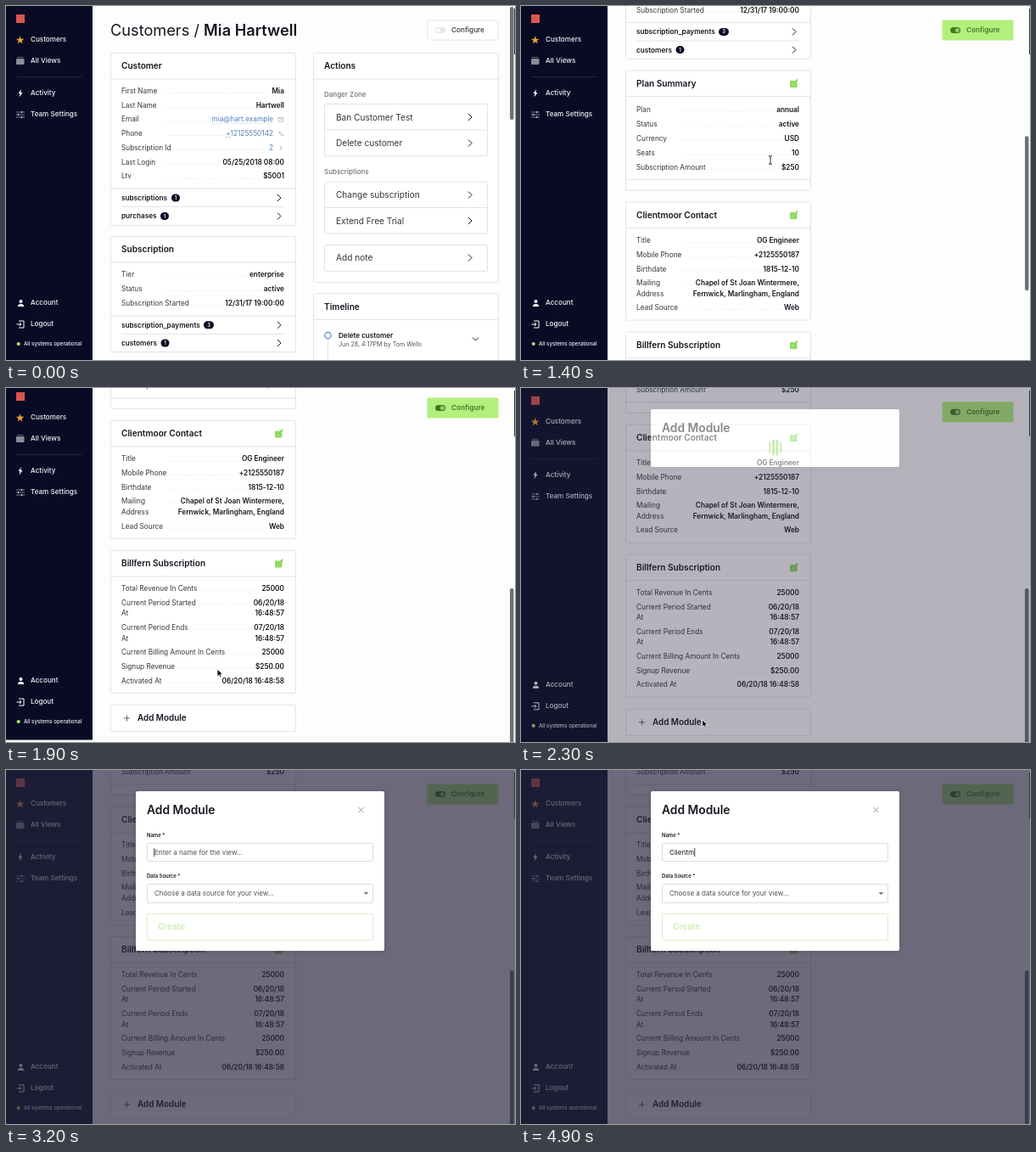
An HTML page for the animation above (5 s loop, 600 by 417 pixels).

```html
<!DOCTYPE html>
<html lang="en">
<head>
<meta charset="utf-8">
<title>Customer view</title>
<style>
html, body { margin: 0; width: 100%; height: 100%; overflow: hidden; background: #fdfdfe; }
svg { display: block; width: 600px; height: 417px; }
text { font-family: Inter, Roboto, sans-serif; white-space: pre; }
.mask text { paint-order: stroke; stroke: #fff; stroke-width: 5px; stroke-linejoin: round; }
</style>
</head>
<body>
<svg id="stage" viewBox="0 0 600 417"></svg>
<script>
const INK = '#15161f', BODY = '#34353f', EDGE = '#e3e3ea', GREEN = '#8edb57';
const SCROLL = 533, LOOP = 5000, TYPED = 'Clientm';

// y is the middle of the capitals
const text = (x, y, s, size = 8.25, weight = 400, fill = BODY, anchor = 'start', extra = '') =>
  `<text x="${x}" y="${y + size * .36}" font-size="${size}" font-weight="${weight}" fill="${fill}" text-anchor="${anchor}" ${extra}>${s}</text>`;
const rect = (x, y, w, h, fill, extra = '') =>
  `<rect x="${x}" y="${y}" width="${w}" height="${h}" fill="${fill}" ${extra}/>`;
const box = (x1, y1, x2, y2, edge = EDGE, fill = '#fff') =>
  rect(x1 + .5, y1 + .5, x2 - x1 - 1, y2 - y1 - 1, fill, `rx="1.5" stroke="${edge}"`);
const line = (d, color = INK, w = 1, extra = '') =>
  `<path d="${d}" fill="none" stroke="${color}" stroke-width="${w}" ${extra}/>`;
const shape = (d, fill) => `<path d="${d}" fill="${fill}"/>`;
const group = (name, s) => `<g class="${name}">${s}</g>`;
const rule = (y, x1 = 124, x2 = 341) => line(`M${x1} ${y}H${x2}`, EDGE);
const chevron = (x, y) => line(`M${x - 2} ${y - 4}l4 4l-4 4`);
const plus = (x, y) => line(`M${x - 3.5} ${y}h7M${x} ${y - 3.5}v7`, '#55565f', .9);
const pencil = (x, y) => group('edit',
  rect(x - 4.5, y - 3.5, 8.5, 8, GREEN, 'rx="1"') +
  line(`M${x - 1.5} ${y + 1.5}l6 -6.5`, '#d5f5bb', 2.2) + line(`M${x - 1} ${y + 1}l5.5 -6`, '#6cc23a', 1.2));

function row(y, label, value, link) {
  const right = link ? 315 : 328;
  const lines = (x, s, weight, fill, anchor, extra) => s.split('|')
    .map((part, i) => text(x, y + i * 12.6, part, 8.25, weight, fill, anchor, extra)).join('');
  return line(`M190 ${y + 2.5}H${right}`, '#e9e9ef', .8, 'stroke-dasharray="1 1"') +
    lines(136, label, 400, BODY, 'start', '') +
    lines(right, value, link ? 400 : 600, link ? '#5480bd' : INK, 'end', link ? 'text-decoration="underline"' : '');
}
const linkRow = (y, label, x, n) =>
  text(136, y, label, 8.2, 600, INK) +
  rect(x - (n > 1 ? 6 : 5), y - 4.5, n > 1 ? 12 : 10, 9, '#0b0d22', 'rx="4.5"') +
  text(x, y, n, 5.8, 600, '#fff', 'middle') + chevron(322, y);
const card = (top, bottom, title, body) =>
  box(123, top, 342, bottom) + rule(top + 31) +
  text(136, top + 15.8, title, 10.1, 600, INK) + pencil(321.5, top + 16) + group('mask', body);

function action(y, label) {
  return text(389, y, label, 10.1, 400, BODY) + group('plain', chevron(547, y)) + pencil(547, y);
}
const pair = (y, title, a, b) =>
  text(375, y, title, 8, 500, '#6d6e78') + box(375, y + 11, 568, y + 73) +
  rule(y + 42, 376, 567) + action(y + 27, a) + action(y + 57.5, b);

const page =
  text(123, 28.5, 'Customers / <tspan font-weight="600">Mia Hartwell</tspan>', 18.2, 400, INK) +
  card(55, 259, 'Customer',
    row(100, 'First Name', 'Mia') + row(117, 'Last Name', 'Hartwell') +
    row(133.5, 'Email', 'mia@hart.example', 1) + row(150, 'Phone', '+12125550142', 1) +
    row(167, 'Subscription Id', '2', 1) + row(184, 'Last Login', '05/25/2018 08:00') +
    row(200.5, 'Ltv', '$5001')) +
  line('M321 131.5h6v4.5h-6zl3 2.5l3 -2.5', '#a9a9b4', .7) +
  line('M322 148q0 4 4.5 5l.5 -1.5l-1.5 -1l-1 .7l-1.5 -2l.5 -1z', '#a9a9b4', .7) +
  line('M323 165l2 2.3l-2 2.3', '#8d8d99', .8) +
  rule(215) + linkRow(226, 'subscriptions', 200, 1) + rule(236.5, 136, 328) + linkRow(247.5, 'purchases', 187, 1) +
  card(271, 408, 'Subscription',
    row(316.5, 'Tier', 'enterprise') + row(333.3, 'Status', 'active') +
    row(350, 'Subscription Started', '12/31/17 19:00:00')) +
  rule(365) + linkRow(375.8, 'subscription_payments', 239, 3) + rule(386.5, 136, 328) + linkRow(397, 'customers', 187.5, 1) +
  card(421, 563, 'Plan Summary',
    row(467, 'Plan', 'annual') + row(484, 'Status', 'active') + row(501, 'Currency', 'USD') +
    row(518, 'Seats', '10') + row(535, 'Subscription Amount', '$250')) + rule(550) +
  card(576, 716, 'Clientmoor Contact',
    row(621.5, 'Title', 'OG Engineer') + row(638, 'Mobile Phone', '+2125550187') +
    row(655, 'Birthdate', '1815-12-10') +
    row(671.5, 'Mailing|Address', 'Chapel of St Joan Wintermere,|Fernwick, Marlingham, England') +
    row(700.7, 'Lead Source', 'Web')) +
  card(729, 898, 'Billfern Subscription',
    row(774, 'Total Revenue In Cents', '25000') +
    row(790.8, 'Current Period Started|At', '06/20/18|16:48:57') +
    row(820, 'Current Period Ends|At', '07/20/18|16:48:57') +
    row(849, 'Current Billing Amount In Cents', '25000') +
    row(866, 'Signup Revenue', '$250.00') + row(882.7, 'Activated At', '06/20/18 16:48:58')) +
  box(123, 911, 342, 943) + plus(142.5, 927) + text(155, 926.7, 'Add Module', 9.9, 600, INK) +
  box(362, 55, 581, 326) + rule(86, 363, 580) + text(375, 70.8, 'Actions', 10.1, 600, INK) +
  pair(104, 'Danger Zone', 'Ban Customer Test', 'Delete customer') +
  pair(195.5, 'Subscriptions', 'Change subscription', 'Extend Free Trial') +
  box(375, 281, 568, 313) +
  group('plain', text(389, 296.5, 'Add note', 10.1) + chevron(547, 296.5) +
    box(362, 338, 581, 470) + rule(369.5, 363, 580) + text(375, 354, 'Timeline', 10.1, 600, INK) +
    line('M379.5 392V420', EDGE) +
    '<circle cx="379.5" cy="388" r="3.7" fill="#fff" stroke="#6e94c9" stroke-width="1.4"/>' +
    text(392, 387.7, 'Delete customer', 8.1, 600, INK) +
    text(392, 398.5, 'Jun 28, 4:17PM by Tom Wells', 7.1, 400, '#50515b') +
    line('M550 390.5l3.5 3.5l3.5 -3.5')) +
  group('edit', plus(391.5, 297) + text(403, 297, 'Create new action', 10, 600, INK));

const star = Array.from({ length: 10 }, (_, i) => {
  const a = i * Math.PI / 5, r = i % 2 ? 2 : 5;
  return [16.7 + r * Math.sin(a), 40.3 - r * Math.cos(a)].map(v => v.toFixed(2));
}).join(' ');
const menu = [[39.5, 'Customers'], [64.5, 'All Views'], [102.5, 'Activity'],
  [127.5, 'Team Settings'], [349.5, 'Account'], [374.5, 'Logout']];
const side = rect(0, 0, 102, 419.5, '#090b25') + rect(12, 10, 10, 10, '#d9574f') +
  menu.map(([y, s]) => text(29, y, s, 8.1, 500, '#f4f4f8')).join('') +
  `<polygon points="${star}" fill="#f2a32c"/>` +
  rect(12, 62, 9.5, 7, '#8b8c98', 'rx="1"') + line('M13 60.5h7.5', '#666775') +
  line('M12 83.5H90', '#20233f') +
  shape('M18 98l-3.5 5h2l-1 4.5l4 -5.5h-2.2z', '#fff') +
  line('M12 125h10M12 128h10M12 131h10', '#8b8c98', .9) + line('M18.5 124v2M14.5 127v2M18.5 130v2', '#d0d0d8', 1.2) +
  '<circle cx="17.5" cy="348" r="2" fill="#fff"/>' + shape('M13.8 354q0 -3 3.7 -3t3.7 3z', '#fff') +
  line('M15 371h6v8h-6M12.5 375h5.5m-2 -2l2 2l-2 2', '#fff') +
  '<circle cx="14.7" cy="398" r="2.1" fill="#a5e36b"/>' +
  text(21, 398, 'All systems operational', 6.15, 500, '#f4f4f8');

const toggle = (x, fill, knob) => rect(506, 25, 12, 7, fill, 'rx="3.5"') +
  `<circle cx="${x}" cy="28.5" r="2.5" fill="${knob}"/>`;
const configure = `<g id="button">` +
  group('plain', box(496.5, 16.5, 580.5, 40.5) + toggle(509.7, '#e6e6ec', '#fff') +
    text(525, 28.5, 'Configure', 8.2, 500, BODY)) +
  group('edit', rect(496.5, 16.5, 84, 24, '#b2f07c', 'rx="1.5"') + toggle(514.3, '#42781f', '#8fcf5c') +
    text(525, 28.5, 'Configure', 8.2, 600, '#46762a')) + '</g>';

const form =
  line('M415.5 44l6 6m0 -6l-6 6', '#8a8b95', .9) +
  text(166, 77, 'Name *', 5.9, 600, INK) + box(166, 86, 433, 108, '#dcdce3') +
  text(175, 97, '', 8.1, 400, BODY, 'start', 'id="name"') + rect(0, 92, .8, 10, INK, 'id="caret"') +
  text(166, 125.3, 'Data Source *', 5.9, 600, INK) + box(166, 134, 433, 157, '#dcdce3') +
  text(175, 145.3, 'Choose a data source for your view...', 8, 400, '#50515b') +
  shape('M421.5 144h6l-3 3z', '#777883') +
  box(166, 169, 433, 201, '#dcefc9') + text(179, 184.7, 'Create', 10, 600, '#cfeeb2');

const bars = [0, 1, 2, 3].map(() => rect(0, 0, 0, 0, GREEN, 'class="bar"')).join('');
const modal = `<g id="modal">` + rect(0, 0, 600, 417, 'rgb(39,36,61)', 'opacity=".68"') +
  rect(153, 25, 293, 68, '#fff', 'id="panel" rx="2" style="filter:drop-shadow(0 1px 3px rgba(0,0,0,.12))"') +
  text(166, 47, 'Add Module', 13.8, 600, INK) +
  `<g id="loader">${bars}</g><g id="form">${form}</g></g>`;

const outlined = (id, d) => `<path id="${id}" d="${d}" fill="#111" stroke="#fff" stroke-width=".8"/>`;
const pointer = `<g id="cursor">` + outlined('arrow', 'M0 0v9l2.1 -1.9l1.5 3.2l1.5 -.7l-1.4 -3.1h2.8z') +
  `<path id="hand" d="M-1 -2.5q1 -1 1.7 0v3l3.3 .9q1.1 .4 .9 1.6l-.7 3.5h-4.6l-2.6 -3.6q-.2 -1.3 1.1 -.9l.9 .8z" fill="#fff" stroke="#111" stroke-width=".8"/>` +
  line('M-2 -5q2 0 2 1.5q0 -1.5 2 -1.5M0 -3.5v7M-2 5q2 0 2 -1.5q0 1.5 2 1.5', '#111', .9, 'id="ibeam"') + '</g>';

const $ = id => document.getElementById(id);
$('stage').innerHTML = rect(0, 0, 600, 417, '#fdfdfe') +
  `<g id="view"><g id="page">${page}</g>${side}${configure}</g>` +
  rect(594, 1, 4.5, 133, '#707078', 'id="thumb" rx="2.2"') + modal + rect(599, 3, 1, 54, '#33333b') + pointer;

const clamp = v => Math.max(0, Math.min(1, v));
const ramp = (t, a, b) => clamp((t - a) / (b - a));
const smooth = v => v * v * (3 - 2 * v);
const show = (el, v) => { el.style.opacity = Number(v); };
const all = name => [...document.querySelectorAll('.' + name)];
const plain = all('plain'), edit = all('edit'), barEls = all('bar');

// time, x, y of the pointer
const path = [[200, 602, -8], [650, 536, 34], [1050, 536, 34], [1350, 294, 181.5],
  [1600, 294, 181.5], [1900, 249, 331], [2200, 213.5, 390.5]];

// smooth curve through the points that never overshoots
function along(t, axis) {
  const i = Math.max(0, Math.min(path.length - 2, path.findLastIndex(p => t >= p[0])));
  const slope = j => path[j + 1] && path[j] ? (path[j + 1][axis] - path[j][axis]) / (path[j + 1][0] - path[j][0]) : 0;
  const tangent = j => {
    const a = slope(j - 1), b = slope(j);
    return a * b > 0 ? 2 * a * b / (a + b) : 0;
  };
  const [p, q] = [path[i], path[i + 1]], k = ramp(t, p[0], q[0]), d = q[0] - p[0];
  return p[axis] + (q[axis] - p[axis]) * smooth(k) +
    d * k * (1 - k) * ((1 - k) * tangent(i) - k * tangent(i + 1));
}

function draw(t) {
  const on = ramp(t, 750, 850);
  plain.forEach(el => show(el, 1 - on));
  edit.forEach(el => show(el, on));

  // scroll down, then a damped spring past the end
  const p = smooth(ramp(t, 1250, 1500));
  const u = Math.max(0, (t - 1500) / 100), bounce = 25 * u * Math.exp(1 - u);
  $('page').setAttribute('transform', `translate(0 ${-SCROLL * p})`);
  $('view').setAttribute('transform', `translate(0 ${-bounce})`);
  $('thumb').setAttribute('y', 1 + 235 * p);
  $('thumb').setAttribute('height', 133 + 49 * on);

  const hover = t > 560 && t < 1100, beam = t > 1300 && t < 1700;
  $('button').style.filter = hover ? 'drop-shadow(0 2px 3px rgba(40,50,40,.3))' : 'none';
  $('cursor').setAttribute('transform', `translate(${along(t, 1)} ${along(t, 2)})`);
  show($('cursor'), t > 200 && t < 2800);
  show($('hand'), hover);
  show($('ibeam'), beam);
  show($('arrow'), !hover && !beam);

  const ready = t >= 2800;
  show($('modal'), ramp(t, 2220, 2380));
  show($('form'), ready);
  show($('loader'), !ready);
  $('panel').setAttribute('height', ready ? 188 : 68);
  barEls.forEach((bar, i) => {
    const s = 1 - .4 * Math.max(0, Math.cos((t - 2400) / 130 - i * 1.6));
    const w = 2.6 * s, h = 18.5 * s;
    bar.setAttribute('x', 293.3 + i * 4.3 - w / 2);
    bar.setAttribute('y', 70 - h / 2);
    bar.setAttribute('width', w);
    bar.setAttribute('height', h);
  });

  const n = Math.max(0, Math.floor((t - 3930) / 160) + 1), name = $('name');
  const value = n ? TYPED.slice(0, n) : 'Enter a name for the view...';
  if (name.textContent !== value) name.textContent = value;
  name.setAttribute('fill', n ? INK : '#50515b');
  $('caret').setAttribute('x', 175 + (n ? name.getComputedTextLength() + .3 : -.6));
  show($('caret'), n || (t - 2800) % 1000 < 500);
}

let start;
function tick(now) {
  start ??= now;
  draw((now - start) % LOOP);
  requestAnimationFrame(tick);
}
draw(0);
requestAnimationFrame(tick);
</script>
</body>
</html>
```
